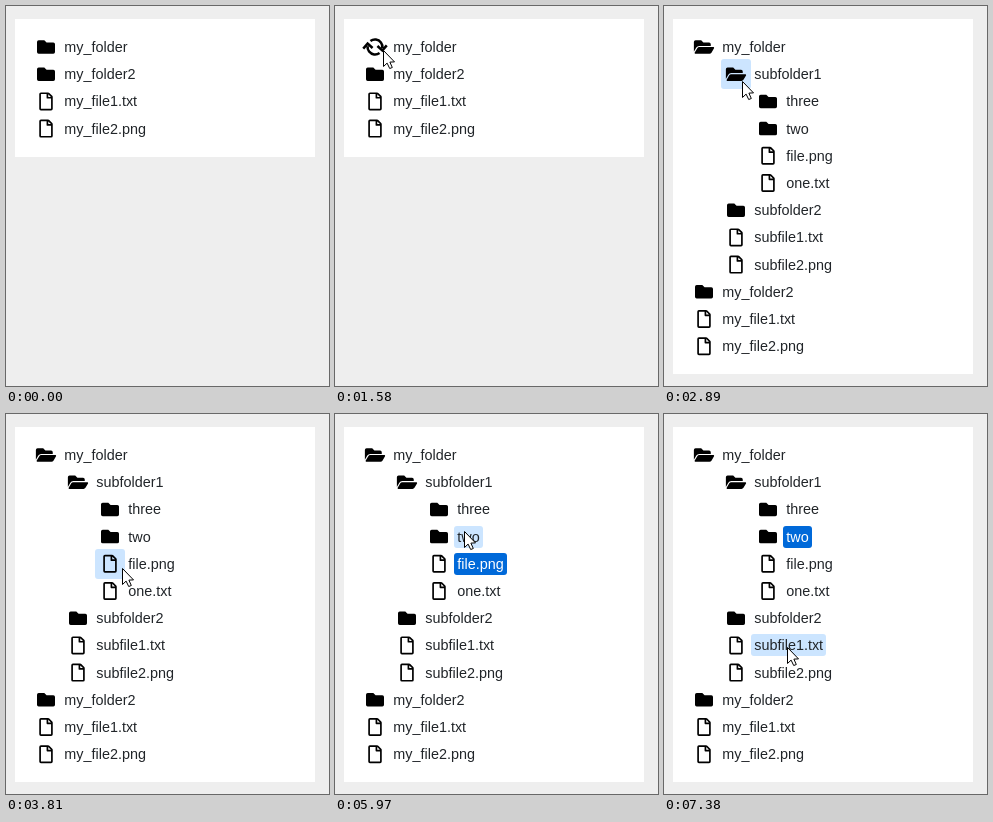
Animation of 323 by 380 pixels, one loop 7.99 s. Source, as an HTML page with a canvas:

```html
<!DOCTYPE html>
<html lang="en">
<head>
<meta charset="utf-8">
<title>File tree</title>
<style>
  html, body { margin: 0; width: 100%; height: 100%; overflow: hidden; background: #eee; }
  canvas { display: block; }
</style>
</head>
<body>
<canvas id="stage" width="323" height="380"></canvas>
<script>
const ctx = document.getElementById('stage').getContext('2d');
const LOOP = 7990;
const FONT = '14.4px "Liberation Sans", Arial, sans-serif';
const INK = '#212529', HOVER = '#cce5ff', SELECTED = '#0069d9';
const ROW = 27.2, INDENT = 32, ICON_SCALE = 18 / 512;

const folder = (name, children = []) => ({ name, children });
const file = name => ({ name });
const sub1 = folder('subfolder1', [folder('three'), folder('two'), file('file.png'), file('one.txt')]);
const top1 = folder('my_folder', [sub1, folder('subfolder2'), file('subfile1.txt'), file('subfile2.png')]);
const tree = [top1, folder('my_folder2'), file('my_file1.txt'), file('my_file2.png')];

// When each folder is clicked and when its contents have loaded.
const loads = new Map([[top1, [1350, 1660]], [sub1, [2660, 2890]]]);
const selections = [[4270, 'file.png'], [6370, 'two']];

// Pointer moves: first step, last step, number of steps, way points.
const moves = [
  [210, 960, 11, [262, 341], [54, 47]],
  [1040, 1120, 2, [54, 47], [48, 44]],
  [2040, 2350, 5, [48, 44], [78, 75]],
  [3500, 3660, 3, [78, 75], [108, 153]],
  [3810, 3960, 3, [108, 153], [133, 157]],
  [5200, 5280, 2, [133, 157], [139, 169]],
  [5510, 5590, 2, [139, 169], [112, 128]],
  [5820, 5970, 3, [112, 128], [129, 117]],
  [6690, 7380, 10, [129, 117], [116, 150], [122, 175], [123, 233]],
];

const shapes = {
  closed: new Path2D('M48 64H208L272 128H464Q512 128 512 176V400Q512 448 464 448H48Q0 448 0 400V112Q0 64 48 64Z'),
  open: new Path2D('M573 292L500 416Q481 448 445 448H45C26 448 15 428 24 412L97 288Q115 256 152 256H552C570 256 582 276 573 292Z' +
    'M152 224H480V176Q480 128 432 128H272L208 64H48Q0 64 0 112V390L69 272Q97 224 152 224Z'),
  file: new Path2D('M370 98L286 14Q272 0 252 0H48Q0 0 0 48V464Q0 512 48 512H336Q384 512 384 464V132Q384 112 370 98Z' +
    'M332 128H256V52ZM48 464V48H208V152Q208 176 232 176H336V464Z'),
};
const shapeWidth = { closed: 512, open: 576, file: 384 };

function pointerAt(t) {
  const move = moves.filter(m => t >= m[0]).pop();
  if (!move) return null;
  const [start, end, steps, ...points] = move;
  const step = Math.min(steps - 1, Math.floor((t - start) / (end - start) * (steps - 1) + 0.05));
  const along = (step + 1) / steps * (points.length - 1);
  const leg = Math.min(points.length - 2, Math.floor(along));
  const [a, b] = [points[leg], points[leg + 1]];
  return a.map((v, i) => Math.round(v + (b[i] - v) * (along - leg)));
}

function visibleRows(items, t, depth = 0) {
  return items.flatMap(node => {
    const isOpen = loads.has(node) && t >= loads.get(node)[1];
    return [{ node, depth, isOpen }, ...(isOpen ? visibleRows(node.children, t, depth + 1) : [])];
  });
}

const inside = (p, [x, y, w, h]) =>
  p && p[0] >= x && p[0] < x + w && p[1] >= y && p[1] < y + h;

function highlight(rect, color) {
  ctx.fillStyle = color;
  ctx.beginPath();
  ctx.roundRect(...rect, 3);
  ctx.fill();
}

function drawIcon(kind, x, y) {
  ctx.save();
  ctx.translate(x, y);
  ctx.scale(ICON_SCALE, ICON_SCALE);
  ctx.translate(-shapeWidth[kind] / 2, -256);
  ctx.fillStyle = '#000';
  ctx.fill(shapes[kind], 'evenodd');
  ctx.restore();
}

function drawSpinner(x, y, elapsed) {
  ctx.save();
  ctx.translate(x, y);
  ctx.rotate(elapsed / 2000 * Math.PI * 2);
  ctx.scale(ICON_SCALE, ICON_SCALE);
  ctx.strokeStyle = '#000';
  ctx.lineWidth = 72;
  for (let half = 0; half < 2; half++) {
    ctx.beginPath();
    ctx.arc(0, 0, 212, Math.PI * 1.06, Math.PI * 1.81);
    ctx.moveTo(220, -256);
    ctx.lineTo(220, -68);
    ctx.lineTo(32, -68);
    ctx.stroke();
    ctx.rotate(Math.PI);
  }
  ctx.restore();
}

function drawRow({ node, depth, isOpen }, index, t, pointer, selected) {
  const left = depth * INDENT, y = 41 + index * ROW, mid = Math.round(y);
  const iconBox = [25 + left, mid - 15, 30, 30];
  const labelBox = [55 + left, mid - 11, Math.round(ctx.measureText(node.name).width + 6.5), 22];
  const load = loads.get(node);

  if (load && t >= load[0] && !isOpen) {
    drawSpinner(40 + left, y, t - load[0]);
  } else {
    if (inside(pointer, iconBox)) highlight(iconBox, HOVER);
    drawIcon(!node.children ? 'file' : isOpen ? 'open' : 'closed', 40 + left, y);
  }

  const isSelected = node.name === selected;
  if (isSelected) highlight(labelBox, SELECTED);
  else if (inside(pointer, labelBox)) highlight(labelBox, HOVER);
  ctx.fillStyle = isSelected ? '#fff' : INK;
  ctx.fillText(node.name, 58.3 + left, mid + 5);
}

function drawPointer([x, y]) {
  const outline = [[0, 0], [0, 16], [3.6, 12.6], [6.2, 18], [8.8, 17], [6.4, 11.6], [11, 11.4]];
  ctx.beginPath();
  outline.forEach(([dx, dy]) => ctx.lineTo(x + dx + 0.5, y + dy + 0.5));
  ctx.closePath();
  ctx.fillStyle = '#fff';
  ctx.fill();
  ctx.strokeStyle = '#000';
  ctx.lineWidth = 1;
  ctx.stroke();
}

function draw(t) {
  const rows = visibleRows(tree, t);
  const pointer = pointerAt(t);
  const selected = (selections.filter(s => t >= s[0]).pop() || [])[1];
  ctx.fillStyle = '#eee';
  ctx.fillRect(0, 0, 323, 380);
  ctx.fillStyle = '#fff';
  ctx.fillRect(9, 13, 300, Math.floor(29.2 + rows.length * ROW));
  ctx.font = FONT;
  rows.forEach((row, i) => drawRow(row, i, t, pointer, selected));
  if (pointer) drawPointer(pointer);
}

const began = performance.now();
function tick() {
  draw((performance.now() - began) % LOOP);
  requestAnimationFrame(tick);
}
tick();
</script>
</body>
</html>
```
